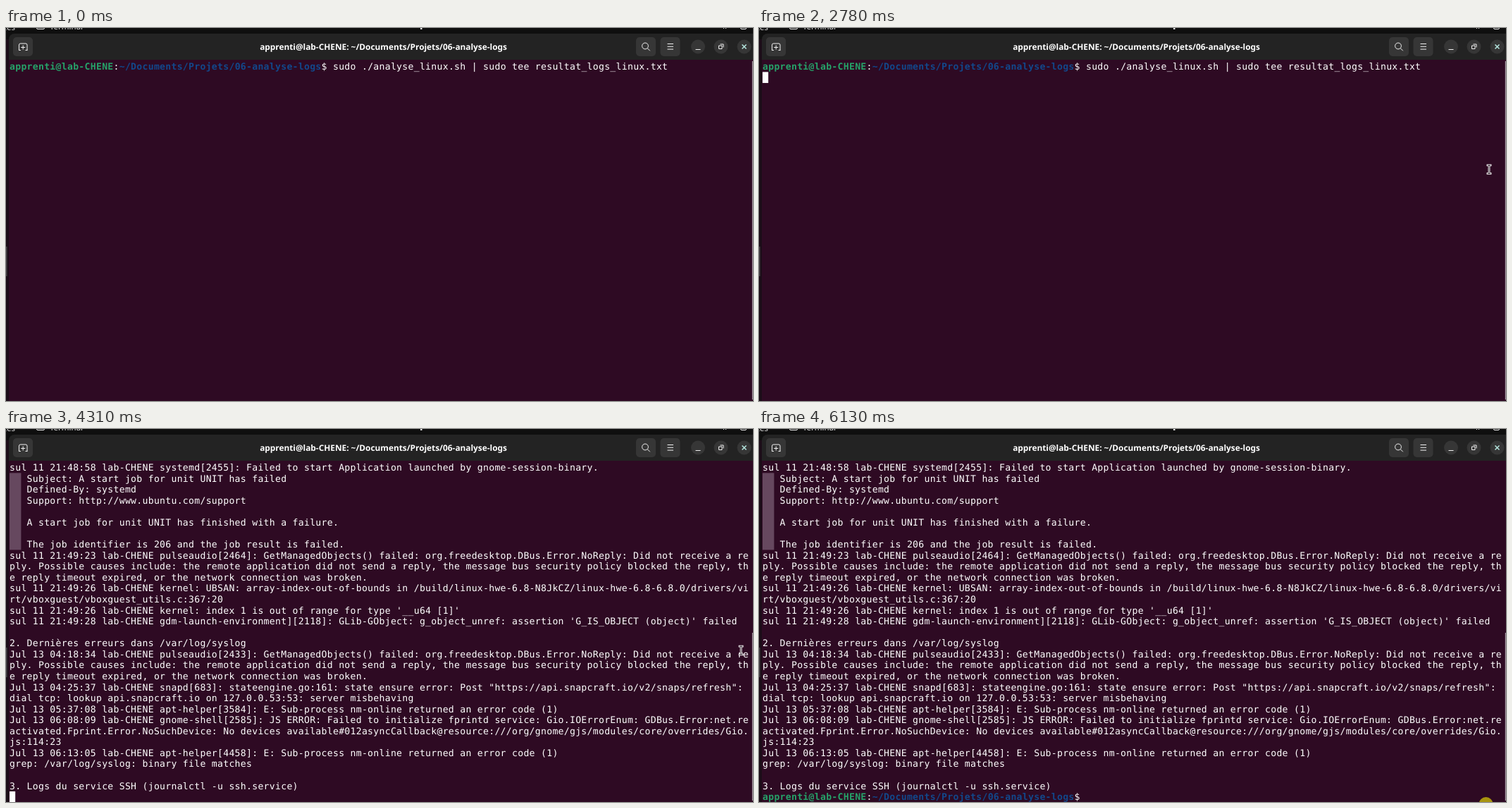
These frames come from a looping animation (1060 by 529 pixels, 6330 ms). An HTML page:

```html
<!DOCTYPE html>
<html lang="fr">
<head>
<meta charset="utf-8">
<title>Terminal</title>
<style>
  html, body { margin: 0; width: 100%; height: 100%; overflow: hidden; background: #2e0a23; }
  svg { display: block; width: 1060px; height: 529px; }
  text { white-space: pre; text-rendering: geometricPrecision; fill: #fff; }
  .mono { font: 13.11px "DejaVu Sans Mono", monospace; letter-spacing: .303px; }
  .user { fill: #26a269; font-weight: bold; }
  .path { fill: #12488b; font-weight: bold; }
  .title { font: bold 11.85px "Noto Sans", "Open Sans", sans-serif; text-anchor: middle; }
  .panel { font: 11.5px "Noto Sans", sans-serif; fill: #ddd; }
  .btn { fill: #363636; }
  .icon { fill: none; stroke: #f2f2f2; stroke-width: 1; }
</style>
</head>
<body>
<svg viewBox="0 0 1060 529">
  <rect width="1060" height="529" fill="#1c0d18"/>
  <rect width="1060" height="16" fill="#0f0f0f"/>
  <text class="panel" x="13" y="2.5" text-anchor="end">Activités</text>
  <rect class="icon" x="43.5" y="-8" width="11" height="9.5" rx="1.5"/>
  <text class="panel" x="62" y="2">Terminal</text>
  <rect x="588" y="0" width="2.5" height="2" fill="#ddd"/>
  <path class="icon" d="M1018 1l2-2 2 2"/>
  <rect class="icon" x="1042.5" y="-7" width="8" height="8.5" rx="1.5"/>
  <rect x="0" y="310" width="1.6" height="42" fill="#454045"/>

  <path d="M4 45V16a8 8 0 0 1 8-8H1060V45Z" fill="#232323"/>
  <rect x="4" y="45" width="1056" height="484" fill="#2e0a23"/>
  <rect id="bar" x="1058.8" width="1.2" fill="#a89aa4"/>

  <g class="btn">
    <rect x="10" y="13" width="28" height="27" rx="5"/>
    <rect x="894" y="13" width="28" height="27" rx="5"/>
    <rect x="928.5" y="13" width="28" height="27" rx="5"/>
    <circle cx="982" cy="26.5" r="10"/>
    <circle cx="1014.5" cy="26.5" r="10"/>
    <circle cx="1047.5" cy="26.5" r="10"/>
  </g>
  <g class="icon">
    <path d="M18.5 31.5V24a2 2 0 0 1 2-2H28a2 2 0 0 1 2 2v7.5M18 31.5h3M27.5 31.5h3M24.2 24.5v6M21.2 27.5h6"/>
    <circle cx="907" cy="25.5" r="4.4"/>
    <path d="M910.2 28.7l3.6 3.6M938.5 22.5h8.5M938.5 26.3h8.5M938.5 30.1h8.5M978.5 30.5h7"/>
    <path d="M1011.5 25h4.5v4.5h-4.5zM1013.5 23h4.5v4.5"/>
    <path d="M1044.5 23.5l6 6M1050.5 23.5l-6 6" stroke="#b5e6de" stroke-width="1.5"/>
  </g>
  <text id="title" class="title" x="535.5" y="30.5"></text>

  <g id="command" class="mono"></g>
  <g id="output" class="mono"><rect x="5" y="62.4" width="16.4" height="109" fill="#66485f"/></g>
  <g id="prompt" class="mono"></g>
  <rect id="block" width="8.2" height="15.6" fill="#fff"/>
  <circle id="click" cx="1031.5" cy="532" r="10" fill="#a8940f"/>
  <g id="mouse" fill="none" stroke-linecap="square">
    <path d="M-2-5.8H2M0-5.8V5.8M-2 5.8H2" stroke="#fff" stroke-width="2.8"/>
    <path d="M-2-5.8H2M0-5.8V5.8M-2 5.8H2" stroke="#1a0a16" stroke-width=".9"/>
  </g>
</svg>
<script>
const LOOP = 6330, LEFT = 5, TOP = 46.8, ROW = 15.57, CELL = 8.196;
const USER = "apprenti@lab-CHENE", DIR = "~/Documents/Projets/06-analyse-logs";
const OUTPUT_AT = 4310, PROMPT_AT = 4380, CLICK_AT = 6130;
const BAR_END = 527;
const BLINKS = [400, 990, 1590, 2190, 2780, 3380, 3970, 4650, 5250, 5860];

// time, x, y of the pointer; y 560 is below the stage
const MOVES = [
  [0, 1030, 560],
  [400, 1030, 476], [460, 1032, 398], [530, 1034, 290], [600, 1035, 224], [660, 1036, 200.5],
  [2910, 1038, 236], [2980, 1041, 292], [3050, 1043, 314],
  [4910, 1028, 477.5], [4980, 1028, 560],
  [5520, 1030, 527], [5590, 1031, 522], [5660, 1032, 524], [5730, 1032, 529], [5860, 1031, 560]
];

const LINES = `sul 11 21:48:58 srv systemd[2455]: Failed to start Application launched by gnome-session-binary.
   Subject: A start job for unit UNIT has failed
   Defined-By: systemd
   Support: http://www.ubuntu.com/support

   A start job for unit UNIT has finished with a failure.

   The job identifier is 206 and the job result is failed.
sul 11 21:49:23 srv pulseaudio[2464]: GetManagedObjects() failed: org.freedesktop.DBus.Error.NoReply: Did not receive a re
ply. Possible causes include: the remote application did not send a reply, the message bus security policy blocked the reply, th
e reply timeout expired, or the network connection was broken.
sul 11 21:49:26 srv kernel: UBSAN: array-index-out-of-bounds in /build/linux-hwe-6.8-N8JkCZ/linux-hwe-6.8-6.8.0/drivers/vi
rt/vboxguest/vboxguest_utils.c:367:20
sul 11 21:49:26 srv kernel: index 1 is out of range for type '__u64 [1]'
sul 11 21:49:28 srv gdm-launch-environment][2118]: GLib-GObject: g_object_unref: assertion 'G_IS_OBJECT (object)' failed

2. Dernières erreurs dans /var/log/syslog
Jul 13 04:18:34 srv pulseaudio[2433]: GetManagedObjects() failed: org.freedesktop.DBus.Error.NoReply: Did not receive a re
ply. Possible causes include: the remote application did not send a reply, the message bus security policy blocked the reply, th
e reply timeout expired, or the network connection was broken.
Jul 13 04:25:37 srv snapd[683]: stateengine.go:161: state ensure error: Post "https://api.snapcraft.io/v2/snaps/refresh":
dial tcp: lookup api.snapcraft.io on 127.0.0.53:53: server misbehaving
Jul 13 05:37:08 srv apt-helper[3584]: E: Sub-process nm-online returned an error code (1)
Jul 13 06:08:09 srv gnome-shell[2585]: JS ERROR: Failed to initialize fprintd service: Gio.IOErrorEnum: GDBus.Error:net.re
activated.Fprint.Error.NoSuchDevice: No devices available#012asyncCallback@resource:///org/gnome/gjs/modules/core/overrides/Gio.
js:114:23
Jul 13 06:13:05 srv apt-helper[4458]: E: Sub-process nm-online returned an error code (1)
grep: /var/log/syslog: binary file matches

3. Logs du service SSH (journalctl -u ssh.service)`.replace(/(:\d\d) srv /g, "$1 lab-CHENE ").split("\n");

const $ = id => document.getElementById(id);
const show = (id, on) => $(id).setAttribute("visibility", on ? "visible" : "hidden");

function write(group, row, col, str, cls = "") {
  const el = document.createElementNS("http://www.w3.org/2000/svg", "text");
  el.setAttribute("x", LEFT + col * CELL);
  el.setAttribute("y", TOP + row * ROW + 12.3);
  el.setAttribute("class", cls);
  el.textContent = str;
  $(group).append(el);
}

function writePrompt(group, row, command) {
  const colon = USER.length, dollar = colon + 1 + DIR.length;
  write(group, row, 0, USER, "user");
  write(group, row, colon, ":");
  write(group, row, colon + 1, DIR, "path");
  write(group, row, dollar, "$ " + command);
}

$("title").textContent = USER + ": " + DIR;
writePrompt("command", 0, "sudo ./analyse_linux.sh | sudo tee resultat_logs_linux.txt");
writePrompt("prompt", 30, "");
LINES.forEach((line, row) => {
  const text = line.trimStart();
  if (text) write("output", row, line.length - text.length, text);
});

function draw(t) {
  const done = t >= OUTPUT_AT, ready = t >= PROMPT_AT;
  show("command", !done);
  show("output", done);
  show("prompt", ready);
  show("click", t >= CLICK_AT);
  show("block", BLINKS.filter(b => b <= t).length % 2);
  $("block").setAttribute("x", LEFT + (ready ? 56 * CELL : 0));
  $("block").setAttribute("y", TOP + (done ? 30 : 1) * ROW);
  const barTop = done ? 289 : 47;
  $("bar").setAttribute("y", barTop);
  $("bar").setAttribute("height", BAR_END - barTop);
  const [, x, y] = MOVES.filter(m => m[0] <= t).pop();
  $("mouse").setAttribute("transform", `translate(${x} ${y})`);
}

const start = performance.now();
function tick() {
  draw((performance.now() - start) % LOOP);
  requestAnimationFrame(tick);
}
tick();
</script>
</body>
</html>
```
